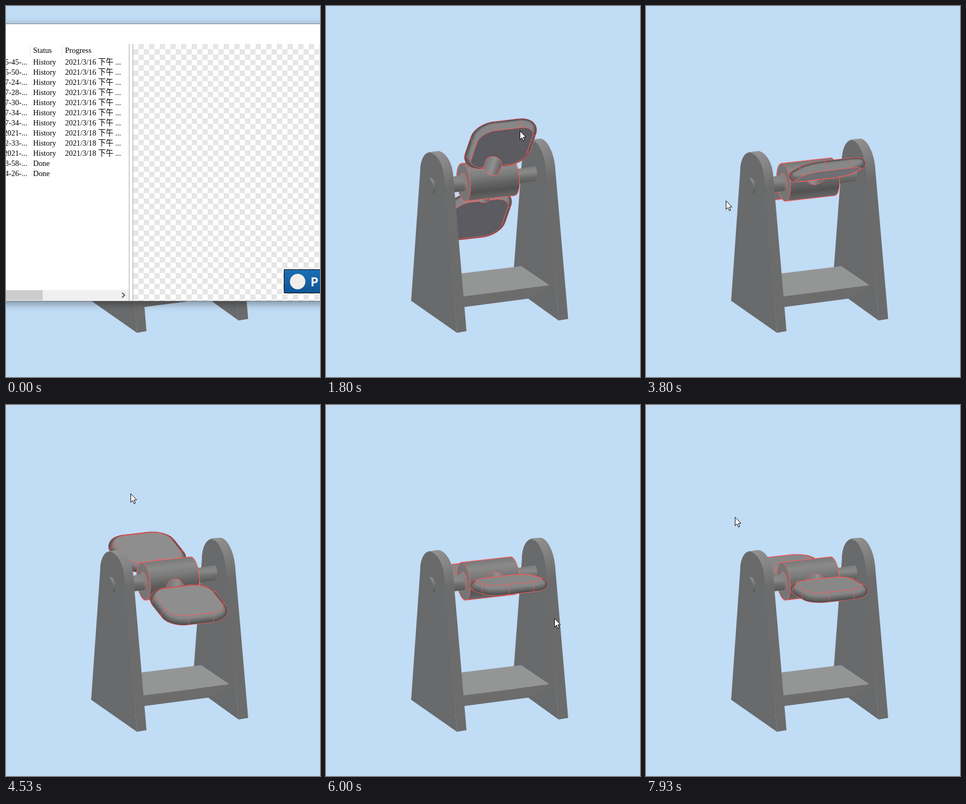
Animation of 590x696 px, one loop 8 s. Source, as an HTML page with a canvas:

```html
<!DOCTYPE html>
<html lang="en">
<head>
<meta charset="utf-8">
<title>Dragging a rotor on a stand</title>
<style>
  html, body { margin: 0; width: 100%; height: 100%; overflow: hidden; background: #c1dcf5; }
  canvas { display: block; width: 590px; height: 696px; }
</style>
</head>
<body>
<canvas id="stage" width="590" height="696"></canvas>
<script>
const ctx = document.getElementById('stage').getContext('2d');
const LOOP = 8000, STEP = 200 / 3, RED = '#ff5c5c';
const gray = v => `rgb(${v},${v},${v})`;
const lerp = (a, b, p) => a + (b - a) * p;

// Keys are [time, value, ...]; monotone cubic interpolation, so nothing overshoots.
const TURN = [[1270, -60], [1800, 54], [2070, 91], [2730, 139.5], [3000, 171], [3800, 262.5],
  [4670, 309], [5070, 372], [5530, 430], [6000, 458.6], [6400, 511], [7270, 622], [7930, 643.6]];
const POINTER = [[600, 330, 720], [870, 292, 430], [1070, 268, 245], [1270, 268, 245],
  [1800, 364, 234], [2300, 407, 370], [2730, 370, 485], [3050, 315, 513], [3400, 212, 480],
  [3800, 150, 365], [4150, 138, 270], [4670, 268, 153], [5070, 317, 153], [5400, 388, 225],
  [5850, 429, 350], [6000, 429, 400], [6400, 370, 489], [6600, 310, 498], [6950, 205, 460],
  [7270, 151, 364], [7600, 139, 280], [7930, 167, 210]];
// Brightness of a flat face by the angle of its normal
const SHADE = [[0, 134], [50, 147], [102, 95], [144, 91], [180, 112]];

function valueAt(keys, t, c = 1) {
  const n = keys.length - 1;
  if (t <= keys[0][0]) return keys[0][c];
  if (t >= keys[n][0]) return keys[n][c];
  const slope = i => i < 0 || i >= n ? 0 : (keys[i + 1][c] - keys[i][c]) / (keys[i + 1][0] - keys[i][0]);
  const tangent = i => {
    const a = slope(i - 1), b = slope(i);
    return a * b > 0 ? 2 * a * b / (a + b) : 0;
  };
  const i = keys.findIndex(k => k[0] > t) - 1;
  const d = keys[i + 1][0] - keys[i][0], s = (t - keys[i][0]) / d, q = 1 - s;
  return keys[i][c] * (1 + 2 * s) * q * q + tangent(i) * d * s * q * q
    + keys[i + 1][c] * s * s * (3 - 2 * s) - tangent(i + 1) * d * s * s * q;
}

// Parallel projection: axle direction and the circle around it
const CENTER = [304.5, 325.5], AXLE = [.931, -.106, -.35], TILT = -.113;
function spoke(deg) {
  const c = Math.cos(deg * Math.PI / 180), s = Math.sin(deg * Math.PI / 180);
  return [-.113 * c + .348 * s, -.994 * c - .04 * s, .937 * s];
}
function projector(deg) {
  const e = spoke(deg), n = spoke(deg + 90);
  return (a, r, h) => [0, 1, 2].map(i => (CENTER[i] || 0) + AXLE[i] * a + e[i] * r + n[i] * h);
}

function trace(points, close = true) {
  ctx.beginPath();
  points.forEach(p => ctx.lineTo(p[0], p[1]));
  if (close) ctx.closePath();
}
function poly(fill, ...points) {
  trace(points);
  ctx.fillStyle = fill;
  ctx.fill();
}
function shape(fill, d) {
  ctx.fillStyle = fill;
  ctx.fill(new Path2D(d));
}
function gradient(x0, y0, x1, y1, ...stops) {
  const g = ctx.createLinearGradient(x0, y0, x1, y1);
  stops.forEach((v, i) => g.addColorStop(i / (stops.length - 1), typeof v === 'number' ? gray(v) : v));
  return g;
}
function strokeRed(width = 1) {
  ctx.strokeStyle = RED;
  ctx.lineWidth = width;
  ctx.stroke();
}
const around = (count, f) => Array.from({ length: count }, (_, i) => {
  const a = i / count * 2 * Math.PI;
  return f(Math.cos(a), Math.sin(a));
});

const REACH = 109, FLAT = 25, CORNER = 31, EDGE = 9.3;

function paddle(deg) {
  const at = projector(deg), side = Math.cos(deg * Math.PI / 180) > 0 ? 1 : -1;
  const outline = h => around(96, (c, s) => at(
    Math.sign(c) * FLAT + c * CORNER, REACH + Math.sign(s) * FLAT + s * CORNER, h));

  ctx.lineJoin = 'round';
  trace(outline(0));
  strokeRed(2 * EDGE + 1.6);
  for (let k = 0; k < 9; k++) {
    const p = k / 9;
    ctx.save();
    ctx.translate(.1 * EDGE * p, -.45 * EDGE * p);
    trace(outline(0));
    ctx.fillStyle = ctx.strokeStyle = gray(Math.round(lerp(78, 142, p)));
    ctx.lineWidth = 2 * EDGE * (1 - p);
    ctx.stroke();
    ctx.fill();
    ctx.restore();
  }

  const normal = ((deg + 90 * side) % 360 + 360) % 360;
  const v = Math.round(valueAt(SHADE, normal));
  trace(outline(EDGE * side));
  ctx.fillStyle = `rgb(${v},${v},${v + (normal > 115 ? 6 : 0)})`;
  ctx.fill();
  strokeRed();

  // Seams over the rounded rim, where straight sides meet the corners
  const depth = at(0, REACH, 0)[2], rim = FLAT + CORNER;
  for (const i of [-1, 1]) for (const j of [-1, 1]) for (const flip of [0, 1]) {
    const seam = [];
    for (let f = 0; f <= 180; f += 15) {
      const out = EDGE * Math.sin(f * Math.PI / 180), h = side * EDGE * Math.cos(f * Math.PI / 180);
      const a = flip ? i * FLAT : i * (rim + out), r = flip ? j * (rim + out) : j * FLAT;
      const base = flip ? at(i * FLAT, REACH + j * rim, 0) : at(i * rim, REACH + j * FLAT, 0);
      const p = at(a, REACH + r, h);
      if (p[2] >= base[2]) seam.push(p);
    }
    trace(seam, false);
    strokeRed(.8);
  }
}

function neck(deg) {
  const at = projector(deg);
  const ring = r => around(32, (c, s) => at(c * 15, r, s * 15));
  const mid = at(0, 42, 0);
  for (let r = 32; r <= 50; r += 2) {
    trace(ring(r));
    strokeRed(1.8);
  }
  ctx.fillStyle = gradient(mid[0] - 15, mid[1] - 5, mid[0] + 15, mid[1] + 5, 118, 145, 92);
  for (let r = 32; r <= 50; r += 2) {
    trace(ring(r));
    ctx.fill();
  }
  for (const a of [-6, 8]) {
    trace([at(a, 36, 13), at(a, 50, 13)], false);
    strokeRed(.8);
  }
}

function ellipse(x, y, r) {
  ctx.beginPath();
  ctx.ellipse(x, y, r * .35, r, TILT, 0, 2 * Math.PI);
}

function rotorBody() {
  const [lx, ly] = [258.4, 330.7], [rx, ry] = [350.6, 320.3], r = 35.7;
  const dx = .113 * r, dy = .994 * r;
  const g = gradient(lx - dx, ly - dy, lx + dx, ly + dy, 120, 138, 124, 100, 82, 104);
  const barrel = new Path2D();
  barrel.moveTo(lx - dx, ly - dy);
  barrel.lineTo(rx - dx, ry - dy);
  barrel.ellipse(rx, ry, r * .35, r, TILT, -Math.PI / 2, Math.PI / 2);
  barrel.lineTo(lx + dx, ly + dy);
  barrel.closePath();
  ctx.fillStyle = g;
  ctx.fill(barrel);
  ctx.strokeStyle = RED;
  ctx.lineWidth = 1.2;
  ctx.stroke(barrel);
  ellipse(lx, ly, r);
  ctx.fillStyle = '#747576';
  ctx.fill();
  strokeRed(1.1);
  ellipse(lx, ly, 17);
  ctx.fillStyle = gradient(0, 315, 0, 348, 134, 128, 92);
  ctx.fill();
  strokeRed();
  poly(gradient(240, 319, 243, 350, 132, 136, 104, 88), [230, 322], [256, 316.5], [260, 347], [230, 351]);
}

function rightSide() {
  const strip = gradient(395, 248, 432, 320, 146, 128, 107);
  shape(strip, 'M368 290C369 263 378 251 388 250L404 249C417 251 430 279 431 308L455 587L437 590L413 312Z');
  shape('#686a6b', 'M353 492L368 290C369 262 378 252 387 252C400 253 412 282 414 312L437 590L380 549L352 529Z');
  poly('#949595', [252, 502], [367, 488], [420, 524], [257, 545]);
  poly('#6c6c6d', [256, 545], [420, 524], [380, 549], [258, 565]);
  shape(gradient(377, 302, 380, 332, 124, 138, 106, 88),
    'M358 306L392 300.5C397 302 399 325 394 328.5L358 334Z');
}

function leftPost() {
  shape(gradient(203, 272, 240, 335, 146, 132, 108),
    'M177 308C178 284 187 275 195 274L211 272C226 274 238 296 239 318L264 610L246 613L221 318Z');
  shape('#686a6b', 'M160 553L177 310C178 285 186 275 195 275C209 277 220 298 222 320L246 613Z');
  shape(gradient(196, 323, 207, 350, 146, 116, 88),
    'M195 323C201 321 206 331 206 340C206 348 204 353 201 353C202 342 200 331 195 323Z');
}

function model(deg) {
  const isFront = Math.sin(deg * Math.PI / 180) >= 0;
  const front = ((isFront ? deg : deg + 180) % 360 + 360) % 360, back = front + 180;
  rightSide();
  paddle(back);
  neck(back);
  rotorBody();
  if (front < 80) {
    paddle(front);
    neck(front);
  } else {
    neck(front);
    paddle(front);
  }
  leftPost();
}

function rect(fill, x, y, w, h) {
  ctx.fillStyle = fill;
  ctx.fillRect(x, y, w, h);
}
function text(str, x, y, align = 'left') {
  ctx.textAlign = align;
  ctx.fillText(str, x, y);
}

const FILES = '5-45 5-50 7-24 7-28 7-30 7-34 7-34 2021 2-33 2021 3-58 4-26'.split(' ');

function listWindow() {
  ctx.save();
  ctx.shadowColor = 'rgba(0,0,0,.4)';
  ctx.shadowBlur = 14;
  ctx.shadowOffsetY = 4;
  rect('#7f8488', -300, 33, 1200, 521);
  ctx.restore();
  rect('#fff', -299, 34, 1198, 519);

  // Checkered preview
  for (let y = 0; y < 49; y++) for (let x = 0; x < 46; x++) {
    if ((x + y) % 2) rect('#e6e6e6', 239 + x * 10, 71 + y * 10, 10, Math.min(10, 482 - y * 10));
  }
  rect('#a0a0a0', 231, 71, 1, 482);
  rect('#a0a0a0', 238, 71, 1, 482);
  rect('#e5e5e5', 45, 71, 1, 24);
  rect('#e5e5e5', 105, 71, 1, 24);

  ctx.font = '14.4px "Liberation Serif", "Noto Sans CJK TC", "Noto Sans CJK JP", serif';
  ctx.fillStyle = '#000';
  text('Status', 51, 88);
  text('Progress', 111, 88);
  FILES.forEach((name, i) => {
    const y = 110 + i * 19;
    text(name + '-...', 40, y, 'right');
    text(i < 10 ? 'History' : 'Done', 51, y);
    if (i < 10) {
      text(`2021/3/${i < 7 ? 16 : 18}`, 111, y);
      text('下午 ...', 173, y);
    }
  });

  rect('#f0f0f0', -299, 533, 530, 19);
  rect('#cdcdcd', -200, 533, 269, 19);
  trace([[218, 538], [223, 542.5], [218, 547]], false);
  ctx.strokeStyle = '#505050';
  ctx.lineWidth = 1.8;
  ctx.stroke();

  rect('#000', 522, 494, 180, 45);
  rect(gradient(0, 495, 0, 538, '#1b6fb5', '#0d5595'), 523, 495, 178, 43);
  ctx.fillStyle = '#f1efec';
  ctx.beginPath();
  ctx.arc(548, 517, 14.5, 0, 7);
  ctx.fill();
  ctx.font = 'bold 24px "Open Sans", sans-serif';
  text('P', 572, 526);
}

function pointer(x, y) {
  ctx.save();
  ctx.translate(Math.round(x) + .5, Math.round(y) + .5);
  trace([[0, 0], [0, 16], [3.7, 12.6], [6.2, 18.5], [8.6, 17.5], [6.2, 11.7], [11, 11.5]]);
  ctx.fillStyle = '#fff';
  ctx.strokeStyle = '#000';
  ctx.lineWidth = 1;
  ctx.lineJoin = 'miter';
  ctx.fill();
  ctx.stroke();
  ctx.restore();
}

function draw(t) {
  rect('#c1dcf5', 0, 0, 590, 696);
  model(valueAt(TURN, t));
  const gone = Math.min(1, Math.max(0, (t - 410) / 300));
  if (gone < 1) {
    ctx.save();
    ctx.globalAlpha = 1 - gone;
    ctx.translate(295, 696);
    ctx.scale(1 - .5 * gone, 1 - .5 * gone);
    ctx.translate(-295, -696 + 260 * gone * gone);
    listWindow();
    ctx.restore();
  }
  if (t >= 600) pointer(valueAt(POINTER, t), valueAt(POINTER, t, 2));
}

let shown = -1;
const start = performance.now();
function tick() {
  const t = (performance.now() - start) % LOOP;
  const step = Math.floor((t + 4) / STEP) % (LOOP / STEP);
  if (step !== shown) {
    shown = step;
    // The opening picture rests for seven steps
    draw(step < 7 ? 0 : step * STEP);
  }
  requestAnimationFrame(tick);
}
tick();
</script>
</body>
</html>
```
